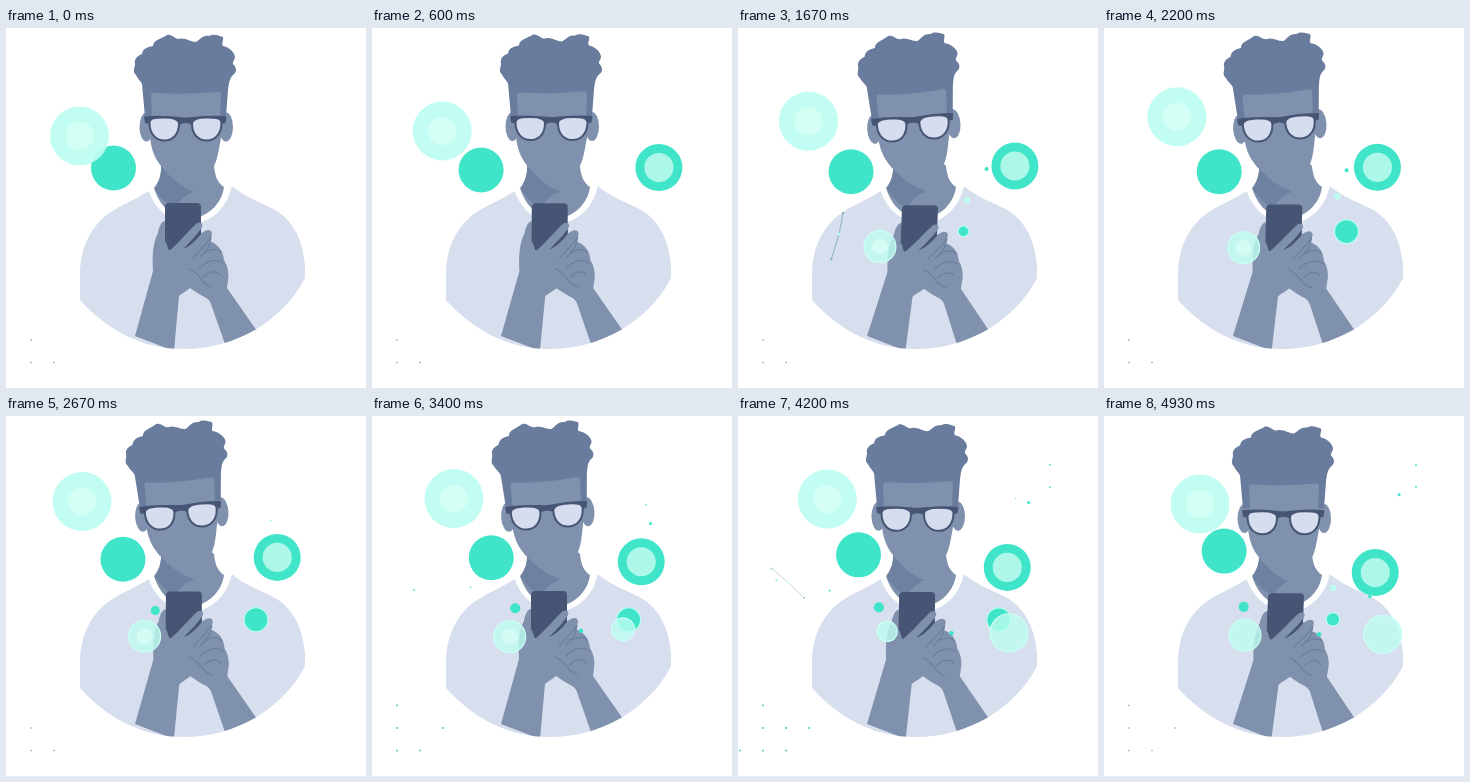
These frames come from a looping animation (360 by 360 pixels, 5 s). An HTML page:

```html
<!DOCTYPE html>
<html lang="en">
<head>
<meta charset="utf-8">
<title>Phone bubbles</title>
<style>
html, body { margin: 0; width: 100%; height: 100%; overflow: hidden; background: #fff; }
svg { display: block; width: 100vw; height: 100vh; }
.skin { fill: #8091ad; }
.hair { fill: #697c9d; }
.dark { fill: #475575; }
.lens { fill: #d6ddee; stroke: #475575; stroke-width: 2; }
.crease { fill: none; stroke: #6c7e9e; stroke-width: 1.2; stroke-linecap: round; }
.thread { fill: none; stroke: #86a9bd; stroke-width: .9; }
</style>
</head>
<body>
<svg viewBox="0 0 360 360">
  <defs>
    <clipPath id="bust"><path id="torso" d="M143 163C126 174 109 179 97 190C82 204 75 222 74 243V272C102 303 137 321 178 321C229 321 277 293 299 250V238C297 213 288 194 271 183C257 175 240 170 227 159Z"/></clipPath>
  </defs>

  <use href="#torso" fill="#d7deee"/>
  <path d="M145 161C153 184 170 193 187 193C206 190 219 176 222.500 159L180 150Z" fill="#fff" stroke="#fff" stroke-width="6"/>
  <path class="skin" d="M155 136C156 148 152 155 148 160C155 182 170 191 186 191C203 188 216 175 218 159C212 155 209 149 208 138L200 130H160Z"/>
  <path d="M155 136C156 148 152 155 149 161C153 168 160 176 169 179C175 172 179 166 188 164Z" fill="#6f81a1"/>

  <g id="head">
    <ellipse class="skin" cx="140.500" cy="99" rx="7" ry="14.500"/>
    <ellipse class="skin" cx="220" cy="99" rx="7" ry="14.500"/>
    <path class="skin" d="M140 70L144 108C145 122 149 130 155 138C164 149 176 160 187 163C197 160 204 148 208 138C212 130 213 120 215 110L220 70Z"/>
    <path class="hair" d="M139 89L136 56C134 52 131 50 130 47C126 43 129 40 129 36C128 31 131 28 136 26C137 20 142 19 147 18C147 12 155 11 161 7C166 6 168 11 173 11C179 9 184 14 190 14C195 11 197 7 203 8C208 5 214 8 217 9C218 13 215 15 217 18C222 19 226 22 228 26C231 31 226 33 227 36C231 40 231 44 227 47C223 51 223 56 222 62L220 89Z"/>
    <path class="skin" d="M145 68Q145 64 150 65Q180 67 211 64Q215 63 215 67L214 93H146Z"/>
    <g id="glasses">
      <path class="dark" d="M138 88.500Q150 87 173 89Q179.500 90 186 89Q209 87 220.500 88.500L219.500 95L215 96L186 97Q179.500 93 173 97L144 96L139 95Z"/>
      <path id="eye" class="lens" d="M143.500 95C143.500 90 149 89.500 158 89.500C168 89.500 173 91 173 96C173 106 167 112.500 158.500 112.500C150 112.500 143.500 106 143.500 95Z"/>
      <use href="#eye" transform="translate(359 0) scale(-1 1)"/>
    </g>
  </g>

  <g clip-path="url(#bust)"><g id="hands">
    <path class="skin" d="M129 308L147 243C146 228 147 214 152 205C153 198 156 192 160 193C163 196 162 203 162 208L170 225L190 215L206 214C212 217 217 222 218 232C222 238 223 246 222 252L221 260L251 303L219 316L205 276C203 270 198 269 193 266L184 260C181 263 176 265 173 268L168 323Z"/>
    <rect class="dark" x="159" y="175" width="36" height="47" rx="4"/>
    <path class="skin" d="M155 213L160 214L163 223C174 214 182 203 191 195C196 193 198 197 195 201L190 208L199 203C204 200 208 204 205 209L203 217L216 224L218 242H156Z"/>
    <path class="dark" d="M177 221C184 214 190 208 195 201V206C190 212 185 218 177 221Z"/>
    <path class="crease" d="M205 209C200 218 192 223 187 230M205 209C204 216 203 221 198 224M194 229C202 220 211 220 215 224M194 240C201 232 211 230 217 235M198 249C203 243 211 242 214 247M183 241C194 244 194 256 206 259"/>
  </g></g>

  <g id="scene"></g>
</svg>

<script>
const LOOP = 5000, STEP = LOOP / 75;
const TEAL = '#40e5c9', PALE = '#bdfdf1', MARK = '#dcfff7';
const $ = id => document.getElementById(id);
const mix = (a, b, u) => a.map((v, i) => v + (b[i] - v) * u);
const ramp = (t, a, b) => Math.min(1, Math.max(0, (t - a) / (b - a)));
const smooth = (t, a, b) => { const u = ramp(t, a, b); return u * u * (3 - 2 * u); };

function set(el, attrs) {
  for (const k in attrs) el.setAttribute(k, attrs[k]);
  return el;
}
function add(parent, tag, attrs = {}) {
  return parent.appendChild(set(document.createElementNS('http://www.w3.org/2000/svg', tag), attrs));
}

// Point on a Bezier curve of any degree.
function bezier(points, u) {
  while (points.length > 1) points = points.slice(1).map((p, i) => mix(points[i], p, u));
  return points[0];
}

const actors = [];

function disc({ fill = TEAL, alpha = 1, ring, mark = 0 }, place) {
  const g = add($('scene'), 'g');
  add(g, 'circle', { fill, 'fill-opacity': alpha, stroke: ring || 'none', 'stroke-width': 1.2 });
  if (mark) add(g, 'circle', { fill: MARK, 'fill-opacity': .7 });
  actors.push(t => {
    const { at: [cx, cy], r, opacity = 1 } = place(t);
    set(g, { opacity: r > 0 ? opacity : 0 });
    [...g.children].forEach((c, i) => set(c, { cx, cy, r: i ? r * mark : r }));
  });
}

// Large bubble floating along a curve for the whole loop.
const float = (r, path, look = {}, born = -LOOP) => disc(look, t => ({
  at: bezier(path, t / LOOP), r: r * smooth(t, born, born + 330)
}));

// Bubble that shoots out, grows and slows down on the way to its goal.
const emit = (born, from, goal, r, grow, look = {}, end = 2 * LOOP) => disc(look, t => {
  const age = Math.max(0, t - born);
  return {
    at: mix(from, goal, age / (age + grow)),
    r: r * Math.min(1, age / grow),
    opacity: 1 - ramp(t, end - 300, end)
  };
});

// Thread drifting from one pose to another while it fades in and out.
function thread(born, end, from, goal, alpha) {
  const g = add($('scene'), 'g');
  const line = add(g, 'polyline', { class: 'thread' });
  const knots = [1, 1.5, 1].map(r => add(g, 'circle', { r, fill: r > 1 ? PALE : '#62afb8' }));
  actors.push(t => {
    const u = ramp(t, born, end), p = mix(from, goal, u);
    set(g, { opacity: alpha * Math.min(1, 1.5 * Math.sin(Math.PI * u)) });
    set(line, { points: p.join(' ') });
    knots.forEach((k, i) => set(k, { cx: p[2 * i], cy: p[2 * i + 1] }));
  });
}

// Specks on a 23 px grid, brighter while they pulse.
function speck(col, row, born, end = LOOP) {
  const c = add($('scene'), 'circle', { cx: 2 + 23 * col, cy: 312 + 22.5 * row });
  actors.push(t => {
    const lit = t > 3200 && t < 4600;
    set(c, { r: t < born || t > end ? 0 : lit ? .9 : .7, fill: lit ? '#38bda9' : '#6f8389' });
  });
}

thread(860, 1940, [105, 176, 134, 225, 118, 244], [105, 188, 90, 200, 85, 227], 1);
thread(3850, 4500, [40, 160, 56, 174, 71, 189], [28, 146, 46, 161, 62, 176], .55);

float(22.5, [[107.5, 140], [111, 146.4], [123.5, 144.7], [120, 134.7]]);
float(29.5, [[73.5, 108], [60.4, 95], [82.4, 70.4], [96.6, 88.8]], { fill: PALE, alpha: .93, mark: .48 });
float(23.5, [[294.3, 143.6], [272, 128.7], [264.5, 146], [271.5, 157]], { mark: .62 }, 150);

const glass = { fill: PALE, alpha: .8, ring: '#c9fff4' };
const pale = { fill: PALE };
emit(900, [158, 211], [135, 222], 16, 330, { ...glass, mark: .5 }, 3800);
emit(3990, [158, 211], [135, 222], 16, 330, glass);
for (const [born, end] of [[1350, 4650], [4540]]) {
  emit(born, [203, 203], [275, 204], 12, 700, { ring: PALE }, end);
}
for (const [born, end] of [[1400, 2500], [4660]]) {
  emit(born, [220, 179], [238, 165], 3.3, 270, pale, end);
}
emit(2976, [222, 208], [299, 222], 19, 700, glass);
emit(2250, [161, 199], [136, 189.5], 5.1, 470);
emit(2900, [199, 209], [219, 220.5], 2.3, 500);

// Sparks
emit(1450, [260, 139], [238, 143], 2, 200, {}, 2500);
emit(2300, [250, 130], [285, 70], .8, 500, {}, 4400);
emit(2900, [251, 155], [306, 60], 1.5, 500);
emit(4700, [268, 172], [264, 188], 1.7, 200);
emit(3000, [110, 166], [84, 178], 1, 500, {}, 4500);
emit(2900, [50, 196], [34, 152], 1, 500, {}, 4400);

for (const [col, row] of [[1, 0], [1, 1], [2, 1]]) speck(col, row, 0);
for (const [col, row] of [[1, -1], [3, 0]]) speck(col, row, 3300);
for (const [col, row] of [[0, 1], [2, 0]]) speck(col, row, 3700, 4800);
for (const y of [49, 71]) emit(3600, [312, y], [312, y], .9, 300);

function draw(t) {
  const angle = -4 * smooth(t, 1000, 1650) * (1 - smooth(t, 3450, 4130));
  const drop = 4.3 * smooth(t, 3450, LOOP);
  set($('head'), { transform: `translate(0 ${drop - .7 * ramp(t, 0, 1000)}) rotate(${angle} 181 163)` });
  set($('glasses'), { transform: `translate(0 ${drop * .5})` });

  // Shear the forearms around their lower ends
  const k = 5 / 130 * Math.abs(Math.sin(Math.PI * t / 3300)) ** 3;
  set($('hands'), { transform: `matrix(1 0 ${-k} ${1 - k * .45} ${k * 308} ${k * .45 * 308})` });

  actors.forEach(move => move(t));
}

const start = performance.now();
function tick() {
  const t = (performance.now() - start) % LOOP;
  draw(Math.floor((t + 3.5) / STEP) * STEP % LOOP);
  requestAnimationFrame(tick);
}
tick();
</script>
</body>
</html>
```
